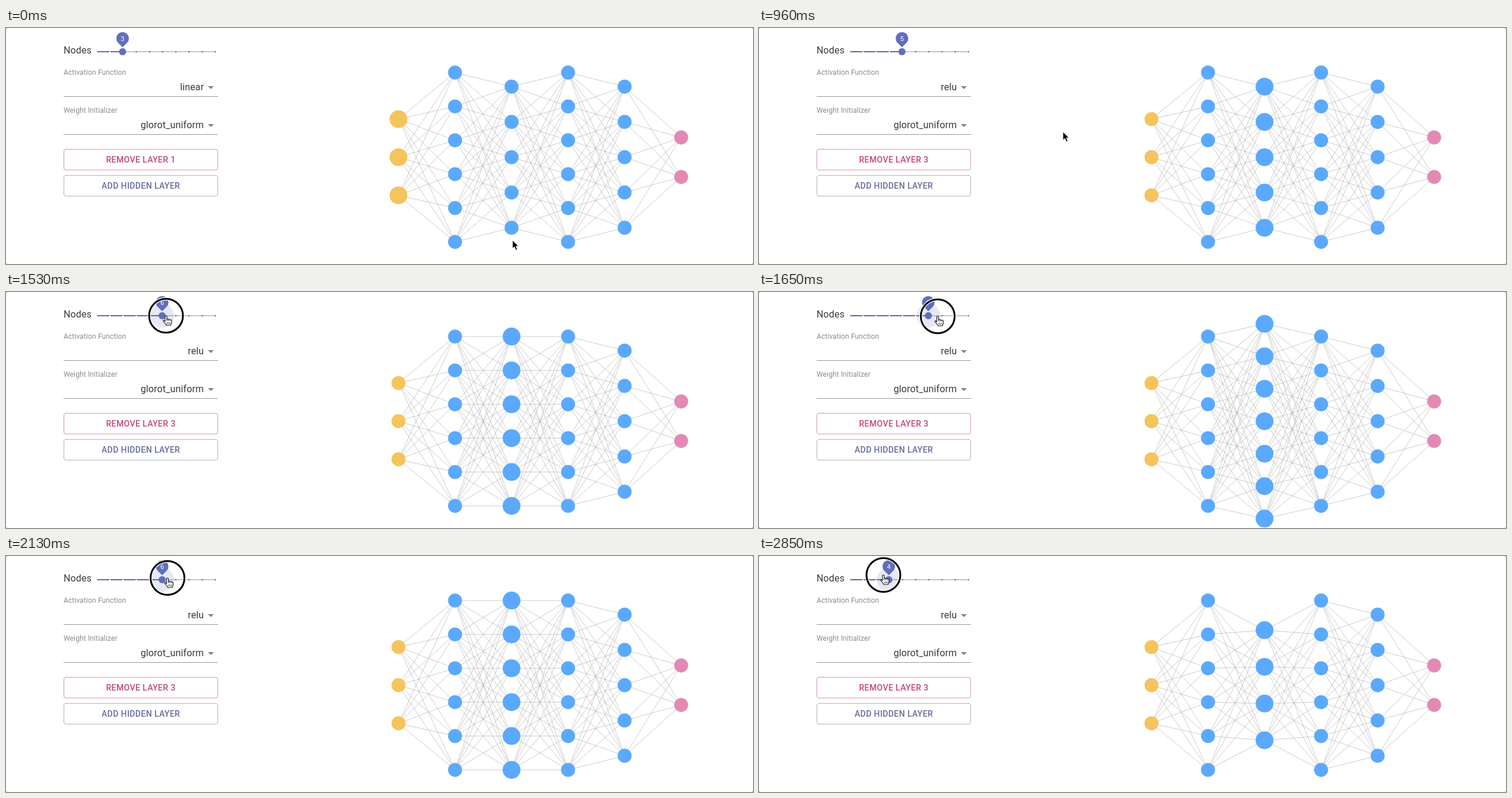
Animation of 1258 by 398 pixels, one loop 3150 ms. Source, as an HTML page:

```html
<!DOCTYPE html>
<html lang="en">
<head>
<meta charset="utf-8">
<title>Network layer editor</title>
<style>
  html, body { margin: 0; width: 100%; height: 100%; overflow: hidden; background: #fff; }
  svg { display: block; width: 100%; height: 100%; font-family: Roboto, sans-serif; }
  .body { font-size: 16px; letter-spacing: .15px; fill: #3a3a3a; }
  .label { font-size: 12px; letter-spacing: .13px; fill: #8b8b8b; }
  .button { font-size: 14px; font-weight: 500; letter-spacing: .4px; text-anchor: middle; }
  .end { text-anchor: end; }
</style>
</head>
<body>
<svg viewBox="0 0 1258 398">
  <rect width="1258" height="398" fill="#999"/>
  <rect width="1258" height="398" rx="3" fill="#fff"/>

  <text class="body" x="97" y="43">Nodes</text>
  <text class="label" x="97" y="79">Activation Function</text>
  <text class="body end" id="activation" x="333.3" y="105"></text>
  <text class="label" x="97" y="143">Weight Initializer</text>
  <text class="body end" x="333.3" y="169">glorot_uniform</text>
  <path d="M97 115.5H357M97 179.5H357" stroke="#999"/>
  <path d="M340 98h10l-5 5zM340 162h10l-5 5z" fill="#858585"/>

  <g fill="none">
    <rect x="97.5" y="204.5" width="259" height="35" rx="3.5" stroke="#d596b2"/>
    <rect x="97.5" y="248.5" width="259" height="35" rx="3.5" stroke="#b3b5c1"/>
  </g>
  <text class="button" id="remove" x="227" y="227" fill="#c3477a"></text>
  <text class="button" x="227" y="271" fill="#666d9c">ADD HIDDEN LAYER</text>

  <path id="edges" fill="none" stroke="#aaa" stroke-width=".6"/>
  <g id="nodes"></g>

  <path d="M152 40H353" stroke="#b5b6c2" stroke-width="1.6"/>
  <path id="track" stroke="#666a9c" stroke-width="2"/>
  <g id="marks"></g>
  <g id="thumb" fill="#606ebd">
    <circle id="halo" cy="40" fill-opacity=".16"/>
    <circle cy="40" r="6"/>
    <path d="M0 32.5L-7.5 25A10.6 10.6 0 1 1 7.5 25Z"/>
    <text id="value" y="21.5" font-size="11" text-anchor="middle" fill="#fff"></text>
  </g>

  <g id="cursor">
    <g id="ring" fill="none">
      <circle r="28.5" stroke="#fff" stroke-width="5.5"/>
      <circle r="28.5" stroke="#000" stroke-width="3"/>
    </g>
    <path id="arrow" d="M0 0V14L3.2 11 5.6 16.6 8.2 15.5 5.8 10H10.2Z" stroke="#fff" stroke-width=".9"/>
    <g id="hand" stroke="#111" stroke-width="1.1" stroke-linejoin="round">
      <path fill="#fff" d="M-1.6 9.6V1.4Q-1.6 0 -.2 0T1.4 1.4V6Q2.4 4.6 4 6.3 5.6 5.2 6.8 7 9 6 9.4 8.4V11.4Q9.2 13 8.2 14.2V16H.2V14.8Q-2 12.6 -4.8 9 -5.2 7.4 -3.6 7.6Z"/>
      <path d="M1.4 6V9M4.1 6.6V9M6.8 7.2V9.2M2 11V14M4.2 11V14M6.4 11V14" stroke-width=".8" fill="none"/>
    </g>
  </g>
</svg>

<script>
const $ = id => document.getElementById(id);
const LOOP = 3150, TICK = 30;
const SELECT_AT = 330, HOVER_AT = 1170, DRAG_AT = 1410;
const LEFT = 152, STEP = 22.2;

// Pointer hotspot: time, x, y
const path = [
  [0, 853, 358], [60, 853, 358], [210, 853, 340], [690, 853, 340],
  [1200, 226, 37], [1320, 226, 37], [1410, 238, 39], [1650, 301, 41],
  [1800, 301, 41], [2130, 272, 37], [2340, 234, 34], [2640, 209.5, 32], [LOOP, 209.5, 32]
];

const ease = u => u * u * (3 - 2 * u);

function pointer(t) {
  const i = path.findIndex(p => p[0] > t);
  const [t0, x0, y0] = path[i - 1], [t1, x1, y1] = path[i];
  const u = ease((t - t0) / (t1 - t0));
  return [x0 + (x1 - x0) * u, y0 + (y1 - y0) * u];
}

function layer(count, i) {
  const gap = 71.4 - 2.38 * count;
  return Array.from({ length: count }, (_, k) =>
    [661 + 95.2 * i, 217.9 + (k - (count - 1) / 2) * gap]);
}

function drawNetwork(middle, selected) {
  const layers = [3, 6, middle, 6, 5, 2].map(layer);
  let edges = '', nodes = '';
  layers.forEach((points, i) => {
    const color = i === 0 ? '#f4c55d' : i === 5 ? '#e389b5' : '#5ba9fd';
    for (const [x, y] of points) {
      nodes += `<circle cx="${x}" cy="${y}" r="${i === selected ? 15 : 11.8}" fill="${color}"/>`;
      for (const [x2, y2] of layers[i + 1] || []) edges += `M${x} ${y}L${x2} ${y2}`;
    }
  });
  $('edges').setAttribute('d', edges);
  $('nodes').innerHTML = nodes;
}

function drawSlider(value) {
  const x = LEFT + (value - 1) * STEP;
  $('track').setAttribute('d', `M${LEFT} 40H${x}`);
  $('thumb').setAttribute('transform', `translate(${x})`);
  $('value').textContent = value;
  $('marks').innerHTML = Array.from({ length: 10 }, (_, i) =>
    `<rect x="${LEFT + i * STEP}" y="39" width="1.8" height="2" fill="${i < value ? '#f4f4fa' : '#555'}"/>`).join('');
}

let state = '';

function render(t) {
  const [x, y] = pointer(t);
  const chosen = t >= SELECT_AT, dragging = t >= DRAG_AT;
  const value = dragging ? Math.min(7, Math.round((x - LEFT) / STEP) + 1) : chosen ? 5 : 3;
  const next = value + '/' + chosen;
  if (next !== state) {
    state = next;
    drawNetwork(chosen ? value : 5, chosen ? 2 : 0);
    drawSlider(value);
    $('activation').textContent = chosen ? 'relu' : 'linear';
    $('remove').textContent = 'REMOVE LAYER ' + (chosen ? 3 : 1);
  }
  const hover = t >= HOVER_AT;
  const pressed = dragging || (t >= 240 && t < SELECT_AT);
  $('halo').setAttribute('r', dragging ? 20 : hover ? 14 : 0);
  $('cursor').setAttribute('transform', `translate(${x} ${y})`);
  $('ring').style.display = pressed ? '' : 'none';
  $('arrow').style.display = hover ? 'none' : '';
  $('hand').style.display = hover ? '' : 'none';
}

const start = performance.now();
function frame() {
  const t = (performance.now() - start) % LOOP;
  render(Math.floor(t / TICK) * TICK);
  requestAnimationFrame(frame);
}
frame();
</script>
</body>
</html>
```
